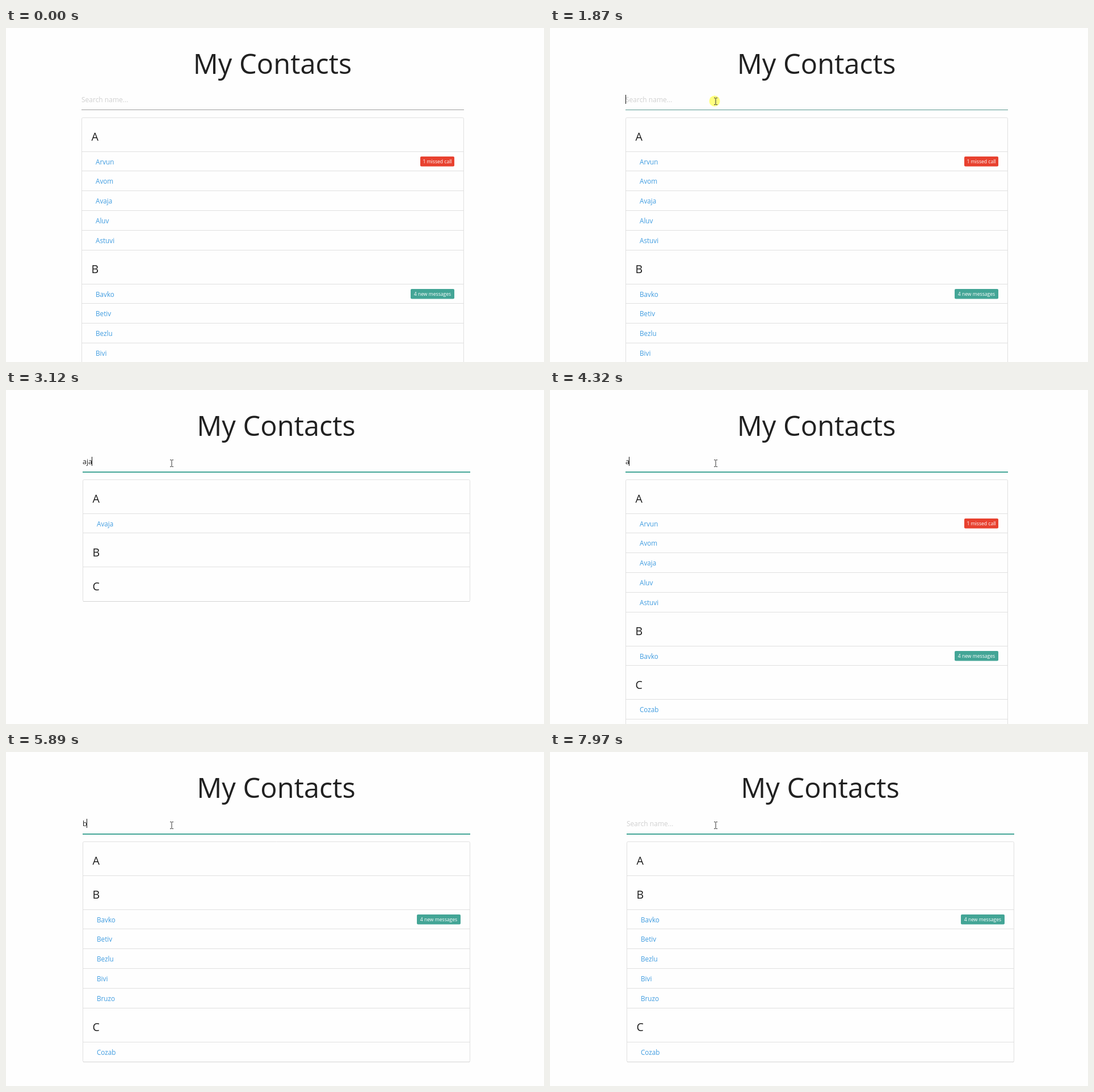
An HTML page with a canvas that plays this animation: 948 by 590 pixels, repeating every 8 s.

```html
<!DOCTYPE html>
<html lang="en">
<head>
<meta charset="utf-8">
<title>My Contacts</title>
<style>
  html, body { margin: 0; width: 100%; height: 100%; overflow: hidden; background: #fefefe; }
  canvas { display: block; }
</style>
</head>
<body>
<canvas id="stage" width="948" height="590"></canvas>
<script>
const ctx = document.getElementById('stage').getContext('2d');
const W = 948, H = 590, LOOP = 8000;
const FAMILY = '"Open Sans", "Noto Sans", sans-serif';
const LIST_TOP = 158, HEAD = 60, ROW = 34.8;
const INPUT_SIZE = 12.45;

const groups = [
  ['A', ['Arvun', 'Avom', 'Avaja', 'Aluv', 'Astuvi']],
  ['B', ['Bavko', 'Betiv', 'Bezlu', 'Bivi', 'Bruzo']],
  ['C', ['Cozab', 'Cavlo']]
];
const badges = {
  Arvun: { label: '1 missed call', width: 60, color: '#e8412f' },
  Bavko: { label: '4 new messages', width: 77, color: '#43a596' }
};

const FOCUS = 1790;
const typed = [[0, ''], [2790, 'a'], [2940, 'aj'], [3120, 'aja'], [4040, 'aj'], [4190, 'a'],
  [4370, ''], [5760, 'b'], [5950, 'be'], [6280, 'bet'], [7200, 'be'], [7610, 'b'], [7970, '']];
// The list is filtered on key release, a little after the text changes.
const filters = [[0, ''], [2940, 'a'], [3060, 'aj'], [3120, 'aja'], [4320, 'a'], [4500, ''],
  [5890, 'b'], [6080, 'be'], [6410, 'bet'], [7380, 'be'], [7710, 'b']];
const caretFlips = [FOCUS, 2330, 2790, 3680, 4190, 4700, 5210, 6820, 7330, 7890];
const moves = [
  { start: 420, end: 610, first: 0, steps: 4, from: [847, 584], to: [615, 414] },
  { start: 840, end: 1030, first: 1, steps: 5, from: [615, 414], to: [388, 238] },
  { start: 1260, end: 1640, first: 1, steps: 9, from: [388, 238], to: [292, 129.5] }
];

const clamp = v => Math.max(0, Math.min(1, v));
const mix = (a, b, k) => a + (b - a) * k;
const valueAt = (events, t) => events.filter(e => e[0] <= t).pop()[1];

function text(str, x, y, size, color, align = 'left') {
  ctx.font = `400 ${size}px ${FAMILY}`;
  ctx.textAlign = align;
  ctx.fillStyle = color;
  ctx.fillText(str, x, y);
}

function rect(x, y, w, h, color) {
  ctx.fillStyle = color;
  ctx.fillRect(x, y, w, h);
}

function visibleRows(query) {
  const rows = [];
  let y = LIST_TOP;
  const add = (label, head) => {
    rows.push({ label, head, y });
    y += head ? HEAD : ROW;
  };
  for (const [letter, names] of groups) {
    add(letter, true);
    names.filter(n => n.toLowerCase().includes(query)).forEach(n => add(n, false));
  }
  return { rows, bottom: y };
}

function drawBadge(badge, right, top) {
  const x = right - 17 - badge.width;
  ctx.fillStyle = badge.color;
  ctx.beginPath();
  ctx.roundRect(x, top + 9, badge.width, 17.5, 2);
  ctx.fill();
  text(badge.label, x + badge.width / 2, top + 21.2, 8.6, '#fff', 'center');
}

function drawList(list, left, right) {
  const bottom = Math.round(list.bottom);
  ctx.strokeStyle = '#e0e0e0';
  ctx.lineWidth = 1;
  ctx.beginPath();
  ctx.roundRect(left + 0.5, LIST_TOP + 0.5, right - left - 1, bottom - LIST_TOP, 2);
  ctx.stroke();
  rect(left + 1, bottom, right - left - 2, 1, '#d4d4d4');
  for (const { label, head, y } of list.rows) {
    if (y > LIST_TOP) rect(left, Math.floor(y + 0.01), right - left, 1, '#e0e0e0');
    if (head) {
      text(label, left + 17.5, y + 41, 19.6, '#1c1c1c');
    } else {
      text(label, left + 25, y + 22.6, 11.7, '#3f9ce0');
      if (badges[label]) drawBadge(badges[label], right, y);
    }
  }
}

function drawInput(t, left, right) {
  const value = valueAt(typed, t);
  if (value) text(value, left, 131, INPUT_SIZE, '#222');
  else text('Search name...', left, 131, 12, '#d0d0d0');

  // On focus the grey line turns teal while a second one fades in below.
  const k = 1 - (1 - clamp((t - FOCUS) / 260)) ** 2;
  const line = [67, 165, 150].map(c => Math.round(mix(158, c, k)));
  rect(left, 144, right - left, 1, `rgb(${line})`);
  if (k > 0) rect(left, 145, right - left, 1, `rgba(67,165,150,${k ** 3})`);

  if (caretFlips.filter(f => f <= t).length % 2) {
    ctx.font = `400 ${INPUT_SIZE}px ${FAMILY}`;
    rect(Math.floor(left + ctx.measureText(value).width), 118, 1, 16, '#111');
  }
}

function drawArrow(x, y) {
  ctx.beginPath();
  [[0, 0], [0, 13.5], [3.1, 10.6], [5.2, 15.6], [7.2, 14.8], [5.2, 9.9], [9.6, 9.6]]
    .forEach(([dx, dy]) => ctx.lineTo(x + 0.4 + dx, y + 0.4 + dy));
  ctx.closePath();
  ctx.fillStyle = '#fff';
  ctx.fill();
  ctx.strokeStyle = '#222';
  ctx.lineWidth = 0.9;
  ctx.stroke();
}

function drawBeam(x, y) {
  const cx = Math.round(x) - 0.5, top = Math.round(y) - 7;
  for (const edge of [top, top + 12]) {
    rect(cx - 2.5, edge, 2.5, 1, '#333');
    rect(cx + 1, edge, 2.5, 1, '#333');
  }
  rect(cx, top + 1, 1, 11, '#333');
}

function drawPointer(t) {
  const move = moves.filter(m => m.start <= t).pop();
  if (!move) return;
  const { start, end, first, steps, from, to } = move;
  const passed = Math.floor(clamp((t - start) / (end - start)) * (steps - first) + 1e-6);
  const k = 1 - (1 - (first + passed) / steps) ** 1.5;
  const x = mix(from[0], to[0], k), y = mix(from[1], to[1], k);
  if (t >= FOCUS && t < 1960) {
    ctx.fillStyle = '#ffff80';
    ctx.beginPath();
    ctx.arc(x - 2, y - 0.5, 9.5, 0, Math.PI * 2);
    ctx.fill();
  }
  if (y < 146) drawBeam(x, y);
  else drawArrow(x, y);
}

function draw(t) {
  rect(0, 0, W, H, '#fefefe');
  const list = visibleRows(valueAt(filters, t));
  // A page taller than the window gives up room to its scrollbar.
  const [left, right] = list.bottom > H ? [133, 807] : [135, 818];
  text('My Contacts', (left + right) / 2 - 0.5, 80.6, 48.8, '#212121', 'center');
  drawList(list, left, right);
  drawInput(t, left, right);
  drawPointer(t);
}

const begin = performance.now();
function tick() {
  draw((performance.now() - begin) % LOOP);
  requestAnimationFrame(tick);
}
tick();
</script>
</body>
</html>
```
